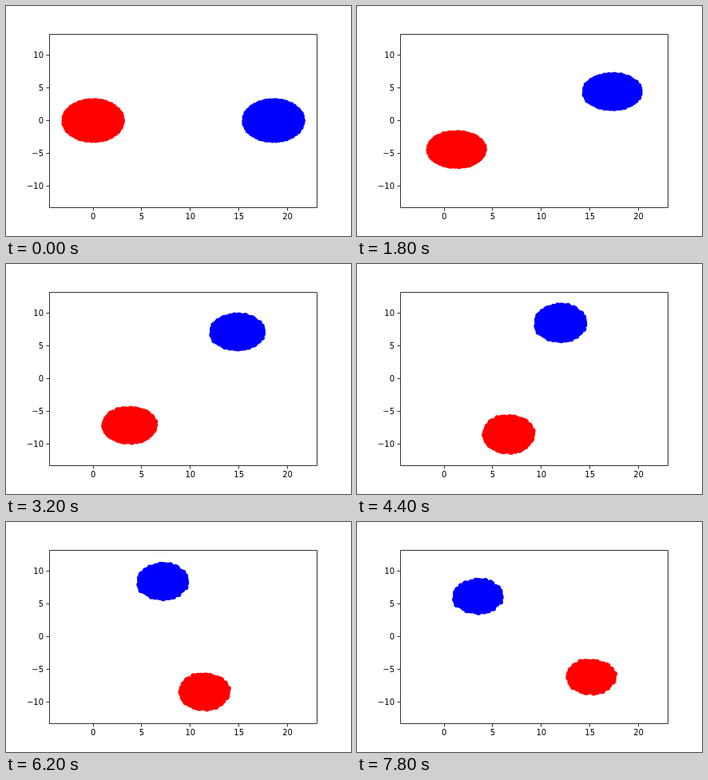
An HTML page with a canvas that plays this animation: 432 by 288 pixels, repeating every 8000 ms.

```html
<!DOCTYPE html>
<html lang="en">
<head>
<meta charset="utf-8">
<title>Two orbiting clusters</title>
<style>
  html, body { margin: 0; width: 100%; height: 100%; overflow: hidden; background: #fff; }
  canvas, svg { position: absolute; left: 0; top: 0; width: 432px; height: 288px; }
  text { font: 10px "DejaVu Sans", sans-serif; fill: #000; }
  path { fill: none; stroke: #333; stroke-width: 1; }
</style>
</head>
<body>
<canvas id="plot" width="432" height="288"></canvas>
<svg id="axes" viewBox="0 0 432 288"></svg>
<script>
const STEP = 200, STEPS = 40, COUNT = 1000, MARKER = 3.5;
const toX = x => 109.1 + 12.17 * x;
const toY = y => 143.4 - 8.2 * y;
const snap = v => Math.floor(v) + 0.5;

function drawAxes() {
  let lines = 'M54.5 35.5H389.5V252.5H54.5Z', labels = '';
  const name = v => String(v).replace('-', '\u2212');
  for (const v of [0, 5, 10, 15, 20]) {
    lines += `M${snap(toX(v))} 253v3.5`;
    labels += `<text x="${toX(v)}" y="267" text-anchor="middle">${name(v)}</text>`;
  }
  for (const v of [-10, -5, 0, 5, 10]) {
    lines += `M54 ${snap(toY(v))}h-3.5`;
    labels += `<text x="47" y="${toY(v) + 3.7}" text-anchor="end">${name(v)}</text>`;
  }
  document.getElementById('axes').innerHTML = `<path d="${lines}"/>${labels}`;
}

function randomizer(seed) {
  return () => (seed = (seed * 48271) % 2147483647) / 2147483647;
}

// Evenly filled disc; every particle also drifts along its own direction.
function makeCluster(color, side, seed) {
  const random = randomizer(seed);
  const dots = Array.from({ length: COUNT }, (_, i) => {
    const r = Math.sqrt((i + 0.5) / COUNT), a = i * 2.39996;
    const drift = Math.sqrt(random()), b = random() * 2 * Math.PI;
    return {
      x: r * Math.cos(a), y: r * Math.sin(a),
      dx: drift * Math.cos(b), dy: drift * Math.sin(b)
    };
  });
  return { color, side, dots };
}

// [step, horizontal extent, vertical extent] of a cluster
const extents = [
  [0, 3.02, 3.04], [9, 2.92, 2.62], [16, 2.71, 2.62], [22, 2.56, 2.76],
  [27, 2.53, 2.7], [34, 2.5, 2.62], [39, 2.45, 2.5]
];

function extentAt(t) {
  const i = Math.max(1, extents.findIndex(e => e[0] >= t));
  const a = extents[i - 1], b = extents[i];
  const k = (t - a[0]) / (b[0] - a[0]);
  return [1, 2].map(j => a[j] + k * (b[j] - a[j]));
}

const clusters = [makeCluster('#f00', -1, 1234577), makeCluster('#00f', 1, 7654321)];
const ctx = document.getElementById('plot').getContext('2d');

function draw(t) {
  const angle = (3.14 * t + 0.0073 * t * t) * Math.PI / 180;
  const orbit = 9.28 - 0.013 * t - 0.0002 * t * t;
  const spread = 0.006 * t;
  const [w, h] = extentAt(t).map(e => e - 0.7 * spread);
  ctx.clearRect(0, 0, 432, 288);
  for (const { color, side, dots } of clusters) {
    const cx = 9.28 + side * orbit * Math.cos(angle);
    const cy = side * orbit * Math.sin(angle);
    ctx.fillStyle = color;
    ctx.beginPath();
    for (const d of dots) {
      const x = toX(cx + w * d.x + spread * d.dx);
      const y = toY(cy + h * d.y + spread * d.dy);
      ctx.moveTo(x + MARKER, y);
      ctx.arc(x, y, MARKER, 0, 2 * Math.PI);
    }
    ctx.fill();
  }
}

let shown = -1;
function tick() {
  const t = Math.floor(performance.now() / STEP) % STEPS;
  if (t !== shown) draw(shown = t);
  requestAnimationFrame(tick);
}

drawAxes();
tick();
</script>
</body>
</html>
```
